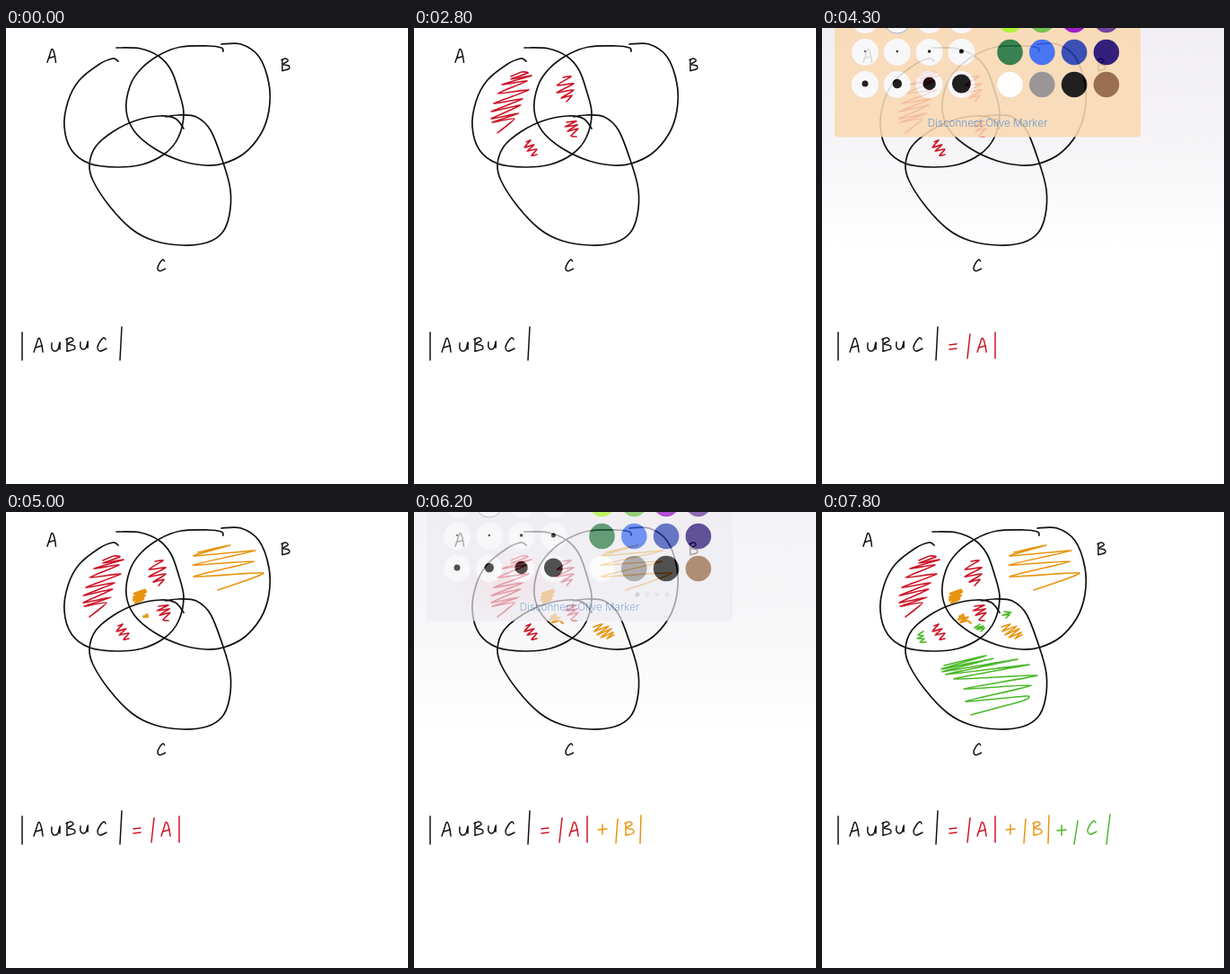
An HTML page for the animation above (8 s loop, 448x508 px).

```html
<!DOCTYPE html>
<html lang="en">
<head>
<meta charset="utf-8">
<title>Union of three sets</title>
<style>
  html, body { margin: 0; width: 100%; height: 100%; overflow: hidden; background: #fff; }
  svg { display: block; width: 100%; height: 100%; }
  #ink path { fill: none; stroke-linecap: round; stroke-linejoin: round; }
  #panel text { font: 300 11.7px Inter, sans-serif; fill: #5790cf; text-anchor: middle; }
</style>
</head>
<body>
<svg viewBox="0 0 448 508">
  <defs>
    <linearGradient id="shade" x2="0" y2="1">
      <stop offset="0" stop-color="#f0edf2"/>
      <stop offset=".55" stop-color="#f5f3f6"/>
      <stop offset="1" stop-color="#f5f3f6" stop-opacity="0"/>
    </linearGradient>
    <radialGradient id="blush">
      <stop offset="0" stop-color="#f5a0b0" stop-opacity=".25"/>
      <stop offset="1" stop-color="#f5a0b0" stop-opacity="0"/>
    </radialGradient>
  </defs>
  <rect id="dim" width="448" height="246" fill="url(#shade)"/>
  <g id="ink"></g>
  <g id="panel"></g>
</svg>
<script>
const LOOP = 8000, STEP = 100;
const BLACK = '#111', RED = '#cc1528', ORANGE = '#e8940f', GREEN = '#4db82a';
const $ = id => document.getElementById(id);
const [ink, panel, dim] = ['ink', 'panel', 'dim'].map($);
const clamp = v => Math.max(0, Math.min(1, v));

function add(parent, tag, attrs) {
  const el = document.createElementNS('http://www.w3.org/2000/svg', tag);
  for (const key in attrs) el.setAttribute(key, attrs[key]);
  return parent.appendChild(el);
}

// Smooth curve through points; tension 0 gives straight lines.
function curve(points, tension) {
  const at = i => points[Math.max(0, Math.min(points.length - 1, i))];
  let d = 'M' + points[0];
  for (let i = 0; i < points.length - 1; i++) {
    const [a, b, c, e] = [at(i - 1), at(i), at(i + 1), at(i + 2)];
    const near = b.map((v, k) => v + (c[k] - a[k]) * tension);
    const far = c.map((v, k) => v - (e[k] - b[k]) * tension);
    d += `C${near} ${far} ${c}`;
  }
  return d;
}

const strokes = [];
function draw(text, color, start = -1, end = 0, { width = 1.5, tension = 1 / 6, place = p => p } = {}) {
  const points = text.split(' ').map(p => place(p.split(',').map(Number)));
  const el = add(ink, 'path', {
    d: curve(points, tension), stroke: color, 'stroke-width': width,
    pathLength: 1, 'stroke-dasharray': '1 2'
  });
  strokes.push({ el, start, end });
}

const GLYPHS = {
  A: ['0,15 3,6 5,0 7,1 9,8 10,15', '2,10 9,8'],
  B: ['1,1 1,8 1,15', '0,2 5,0 8,3 2,7 9,9 9,13 1,15'],
  C: ['9,2 7,0 3,4 0,11 3,15 10,12'],
  U: ['0,1 0,7 3,10 7,8 9,0 9,8'],
  '=': ['0,1 8,0', '0,6 8,5'],
  '+': ['0,6 10,5', '5,0 5,11']
};
function write(name, x, y, color, start = -1, end = 0, scale = 1) {
  const parts = GLYPHS[name], span = (end - start) / parts.length;
  parts.forEach((part, i) => draw(part, color, start + i * span, start + (i + 1) * span,
    { place: ([px, py]) => [x + px * scale, y + py * scale] }));
}
const bar = (x0, y0, x1, y1, color, start, end) => draw(`${x0},${y0} ${x1},${y1}`, color, start, end);
const scribble = (text, color, start, end, width = 1.6) => draw(text, color, start, end, { width, tension: .09 });

// Venn diagram
const ring = text => draw(text, BLACK, -1, 0, { width: 1.7 });
ring('123,22 150,23 171,32 184,47 192,69 198,95 192,122 177,140 152,152 123,155 93,151 73,136 65,110 69,82 81,59 103,41 119,34 125,37');
ring('240,18 262,18 282,32 293,62 293,92 284,118 265,140 242,151 222,153 195,148 165,134 143,115 134,92 138,65 150,46 171,30 195,21 225,20 240,22 242,26');
ring('178,99 192,97 212,99 228,114 242,150 250,180 249,208 241,228 224,239 197,242 165,237 140,224 115,198 97,170 93,152 100,132 120,115 145,103 172,98 189,101 198,112');
write('A', 46, 24, BLACK, -1, 0, .95);
write('B', 307, 34, BLACK, -1, 0, .9);
write('C', 169, 258, BLACK, -1, 0, .85);

// Left-hand side
bar(18, 339, 18, 370, BLACK);
write('A', 31, 346, BLACK);
write('U', 51, 350, BLACK);
write('B', 67, 345, BLACK);
write('U', 83, 349, BLACK, -1, 0, .9);
write('C', 102, 345, BLACK);
bar(129, 333, 127, 370, BLACK);

// Set A
scribble('108,54 120,49 127,50 108,57 131,53 98,63 126,59 93,73 128,69 89,84 121,79 86,93 119,86 86,101 117,95 87,105 112,101 93,117', RED, 550, 1100);
scribble('166,55 175,54 159,64 178,62 159,72 178,69 164,78 176,75 170,82', RED, 1100, 1400);
scribble('125,127 130,125 123,133 134,130 126,137 137,135 131,142 137,141', RED, 1500, 1900);
scribble('170,105 181,104 168,110 182,108', RED, 2300, 2500);
scribble('182,108 171,115 183,112 175,120 181,121', RED, 2600, 2800);
write('=', 142, 352, RED, 3300, 3500);
bar(165, 341, 162, 368, RED, 3600, 3700);
write('A', 173, 346, RED, 3700, 3900);
bar(193, 339, 193, 368, RED, 3900, 4000);

// Set B
scribble('214,45 250,37 209,49 278,43 208,59 277,55 209,72 287,68 236,87', ORANGE, 4500, 4800);
scribble('143,91 155,87 142,95 156,89 142,98 155,93 144,101 153,97', ORANGE, 4800, 4950, 2.8);
scribble('153,116 158,117 157,114 152,120 163,117 154,123 162,121 166,124', ORANGE, 4950, 5150, 2);
scribble('200,128 210,125 201,133 217,127 204,137 220,130 208,140 222,134 215,141 223,137', ORANGE, 5100, 5250);
write('+', 205, 348, ORANGE, 5250, 5350);
bar(227, 342, 225, 369, ORANGE, 5350, 5400);
write('B', 235, 345, ORANGE, 5400, 5500);
bar(253, 338, 252, 369, ORANGE, 5500, 5600);

// Set C
scribble('136,171 183,160 133,175 191,163 134,178 218,164 138,181 231,170 147,186 240,182 158,197 234,193 160,211 228,205 225,210 166,226', GREEN, 6300, 6600);
scribble('113,133 107,137 113,138 106,141 114,141 109,145 116,145', GREEN, 6600, 6700);
scribble('176,125 170,129 180,127 172,131 181,129 177,133', GREEN, 6750, 6850);
scribble('203,111 211,112 201,115 209,114 205,118', GREEN, 6850, 6950);
write('+', 262, 349, GREEN, 6950, 7100);
bar(285, 344, 281, 370, GREEN, 7100, 7200);
write('C', 296, 344, GREEN, 7200, 7400);
bar(321, 337, 317, 370, GREEN, 7400, 7600);

// Pen picker
const sheet = add(panel, 'rect', { x: 14, y: -20, width: 341, height: 141.5, rx: 4 });
const blush = add(panel, 'ellipse', { cx: 105, cy: 82, rx: 60, ry: 38, fill: 'url(#blush)' });
const disc = (cx, cy, r, fill, stroke = 'none') => add(panel, 'circle', { cx, cy, r, fill, stroke });
const nibs = [.9, 1.2, 1.8, 2.5, 3.5, 5.2, 7.2, 10.5];
const swatches = ['#a6f51e', '#67bd3b', '#9200c4', '#5f2a91', '#1d7038', '#2f62f2', '#2038ad', '#170069',
  '#fff', '#8d898a', '#000', '#8d5b36'];
swatches.forEach((color, i) => {
  const col = i % 4, y = -9 + 36 * Math.floor(i / 4);
  disc(48 + col * 35.8, y, 15, '#f9f9fb', i === 1 ? '#8fa6c8' : 'none');
  if (i > 3) disc(48 + col * 35.8, y - 1, nibs[i - 4], '#000');
  disc(209.5 + col * 35.8, y, 14.3, color);
});
const pager = [0, 1, 2, 3].map(i => disc(249 + i * 11, 92, 2.4, i ? '#dddce2' : '#bfbec6'));
add(panel, 'text', { x: 184.5, y: 110 }).textContent = 'Disconnect Olive Marker';

const fade = (t, show, hide) => clamp((t - show) / 150) * clamp(1 - (t - hide) / 150);

function render(t) {
  for (const { el, start, end } of strokes) {
    const p = clamp((t - start) / (end - start));
    el.style.visibility = p > 0 ? 'visible' : 'hidden';
    el.style.strokeDashoffset = 1 - p;
  }
  const warm = t < 5000;
  const opacity = warm ? fade(t, 4000, 4280) : fade(t, 5600, 6150);
  panel.style.opacity = dim.style.opacity = opacity;
  sheet.setAttribute('fill', warm ? '#fad9b2' : '#eeedf2');
  for (const el of [...pager, blush]) el.style.display = warm ? 'none' : '';
}

const origin = performance.now();
function tick() {
  const t = (performance.now() - origin) % LOOP;
  render(Math.floor(t / STEP) * STEP);
  requestAnimationFrame(tick);
}
tick();
</script>
</body>
</html>
```
